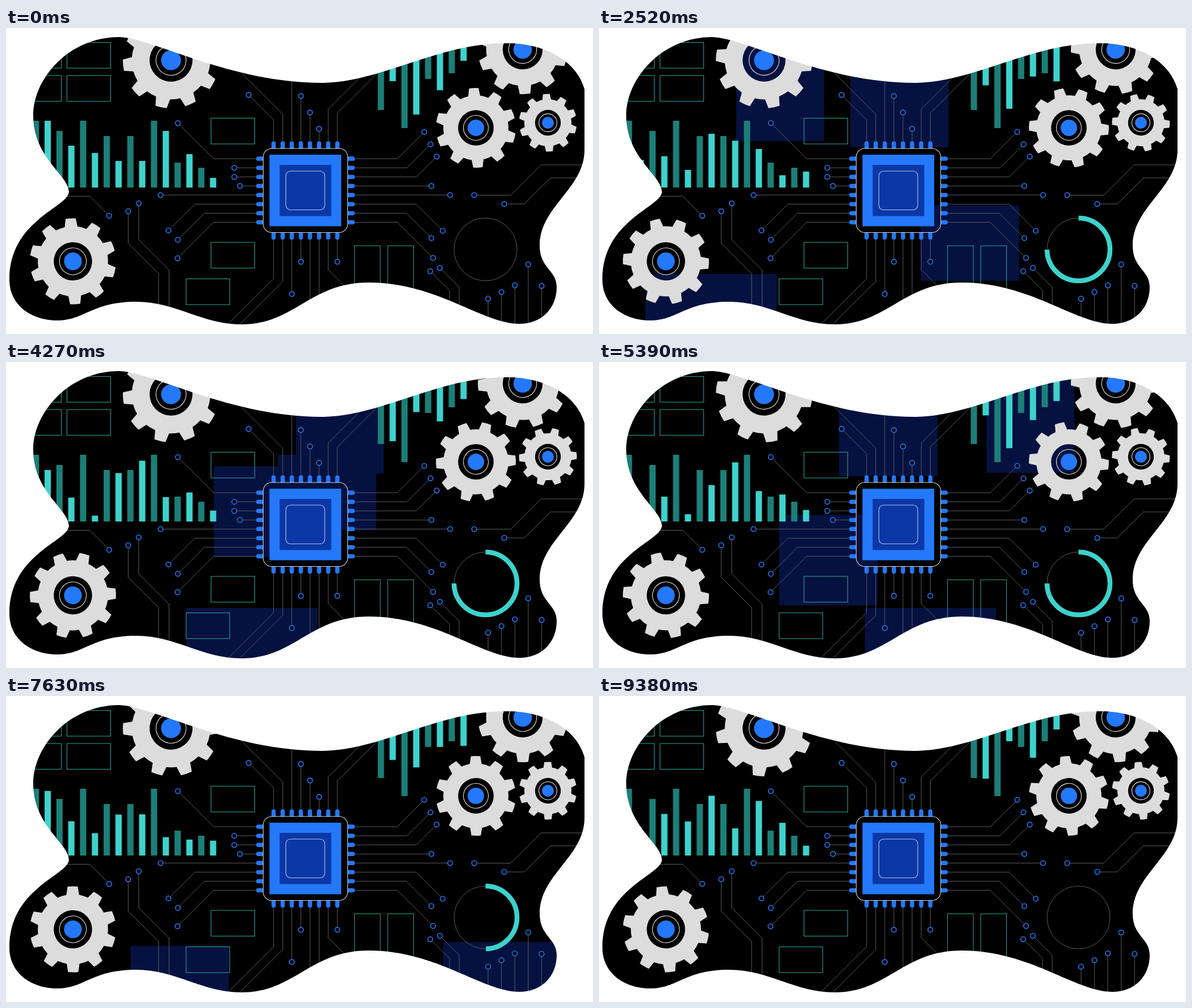
Animation, 1035 px wide and 541 px high, one loop 9.45 s. Source, as an HTML page with a canvas:

```html
<!DOCTYPE html>
<html lang="en">
<head>
<meta charset="utf-8">
<title>Circuit board</title>
<style>
html, body { margin: 0; width: 100%; height: 100%; overflow: hidden; background: #fff; }
canvas { display: block; }
</style>
</head>
<body>
<canvas id="stage" width="1035" height="541"></canvas>
<script>
const ctx = document.getElementById('stage').getContext('2d');
const LOOP = 9.45, STEP = 0.07, TAU = Math.PI * 2, RAD = TAU / 360;
const BLUE = '#2478fa', NAVY = '#051240', TEAL = '#3dd2cc', DEEP_TEAL = '#1b7f78',
  OUTLINE = '#2a9a93', WIRE = '#5c5c62', GEAR = '#dcdcdc';

// Everything outside the blob, painted last as a white mask
const mask = new Path2D(`M0 0H1035V541H0Z
  M200 16C110 16 48 90 48 155C48 230 111 260 111 290C108 318 6 340 6 445
  C6 490 45 517 90 517C140 517 150 484 230 484C300 484 345 524 415 524C510 524 535 450 640 450
  C760 450 840 523 905 523C945 523 971 495 971 458C971 428 941 425 941 385
  C941 315 1020 285 1020 215V108C1005 55 945 27 885 27C765 25 668 94 560 97C397 98 260 18 200 16Z`);

// Wires leaving the chip, clockwise from the top: straight run / 45° run, * for no ring
const chipWires = [
  '38/-44 48/-78* 115* 80 51 22 57/62* 50/76*',
  '75/-47.5 92/-41.5 108.5/-36 135 168 108/47 91/44 75/63',
  '39 53/-34* 116* 126* 39 96 74/80* 69/82*',
  '75/-63.5 91/-47 108/-46.5 168.5 28.5 38.5 38.5 75/63'
].map(side => side.split(' '));

// Wires away from the chip, starting at their ring
const looseWires = [
  '182,332 148,297.5 105,297.5', '215.5,324 215.5,380.5 269,434 269,492',
  '234,310 234,374.5 287.5,428 287.5,492', '825.5,295.5 890,295.5 943.5,242 1020,242',
  '878.5,311 914,311 960,265 1012,265', '748,430 782,463.5 782,490', '765,424 799,458 799,496',
  ...[478.5, 467, 455, 418, 456].map((y, i) => `${850 + 23.6 * i},${y} ${850 + 23.6 * i},525`)
].map(text => text.split(' ').map(p => p.split(',').map(Number)));

// Bars alternate: a still one (its end), then a moving one (from, to, cycles per loop)
const lowBars = [164, [164, 268, 2.5], 182, [208, 243, 1], 164, [221, 277, 1], 191, [235, 175, 1.5],
  191, [235, 168, 1], 164, [182, 262, 3], 238, [223, 263, 2], 247, [265, 253, 2]];
const highBars = [145, [94, 149, 3.5], 177, [153, 76, 3.5], 90, [110, 84, 2], 80, [58, 97, 2]];

const clamp = (v, lo, hi) => Math.min(hi, Math.max(lo, v));
const zigzag = u => 1 - Math.abs(1 - 2 * (u % 1));

function fillRect(color, x, y, w, h) {
  ctx.fillStyle = color;
  ctx.fillRect(x, y, w, h);
}

function stroke(color, width) {
  ctx.strokeStyle = color;
  ctx.lineWidth = width;
  ctx.stroke();
}

function circle(x, y, r) {
  ctx.beginPath();
  ctx.arc(x, y, r, 0, TAU);
}

function roundBox(x, y, w, h, r) {
  ctx.beginPath();
  ctx.roundRect(x, y, w, h, r);
}

function drawWire(points, ringed = true) {
  ctx.beginPath();
  points.forEach(p => ctx.lineTo(...p));
  stroke(WIRE, 1);
  if (!ringed) return;
  circle(...points[0], 4.3);
  ctx.fillStyle = '#000';
  ctx.fill();
  stroke('#226ce0', 1.8);
}

function drawShades(t) {
  fillRect(NAVY, -257.6 + 134.8 * t, 435, 231, 120);
  fillRect(NAVY, -145.4 + 153.7 * t, -20, 155, 223.5 - 1.4 * t);
  fillRect(NAVY, 693.7 - 50.2 * t, 528.7 - 85.4 * t, 173.5, 133.5);
  fillRect(NAVY, 553 - 43.7 * t, -142 + 76.5 * t, 173.5, 160);
}

function drawPanels() {
  const long = 77, short = 45.5;
  ctx.strokeStyle = OUTLINE;
  ctx.lineWidth = 1.1;
  for (const y of [25.5, 84])
    for (const x of [20.5, 107.5]) ctx.strokeRect(x, y, long, short);
  for (const [x, y] of [[361.5, 159.5], [361.5, 379], [317.5, 443.5]]) ctx.strokeRect(x, y, long, short);
  for (const x of [614.5, 673]) ctx.strokeRect(x, 385, short, long + 10);
}

function drawChip() {
  ctx.save();
  ctx.translate(528, 287.3);
  for (const side of chipWires) {
    side.forEach((route, i) => {
      const x = (i - 3.5) * 16.05, [run, slant = 0] = route.replace('*', '').split('/').map(Number);
      const turn = -87 - run;
      drawWire([[x + slant, turn - Math.abs(slant)], [x, turn], [x, -87]], !route.endsWith('*'));
      roundBox(x - 3.75, -87, 7.5, 13, [3.7, 3.7, 0, 0]);
      ctx.fillStyle = BLUE;
      ctx.fill();
    });
    ctx.rotate(TAU / 4);
  }
  ctx.restore();
  roundBox(453.5, 213, 149, 148.5, 15);
  stroke('#d4d4d4', 1.1);
  fillRect(BLUE, 464.5, 224, 126.5, 126.5);
  fillRect('#0b38a6', 482.5, 242, 91, 90.5);
  roundBox(493.5, 253, 68.5, 68.5, 8);
  stroke('#b4c3ea', 1.1);
}

function drawBars(bars, left, base, t) {
  bars.forEach((bar, i) => {
    const moving = i % 2, [from, to, cycles] = moving ? bar : [bar, bar, 0];
    const end = from + (to - from) * zigzag(cycles * t / LOOP);
    fillRect(moving ? TEAL : DEEP_TEAL, left + i * 20.83, base, 11, end - base);
  });
}

function drawDial(t) {
  circle(845.5, 391.5, 55.5);
  stroke(WIRE, 1);
  const sweep = 122 * clamp(Math.min(t - 0.31, 9.1 - t), 0, 270 / 122);
  if (!sweep) return;
  ctx.beginPath();
  ctx.arc(845.5, 391.5, 55.5, -TAU / 4, (sweep - 90) * RAD);
  stroke(TEAL, 8.5);
}

function drawGear(x, y, r, angle) {
  ctx.save();
  ctx.translate(x, y);
  ctx.rotate((angle - 90) * RAD);
  ctx.beginPath();
  for (let a = 0; a < 360; a += 36) {
    ctx.arc(0, 0, r, (a - 6.8) * RAD, (a + 6.8) * RAD);
    ctx.arc(0, 0, r * 0.815, (a + 10.5) * RAD, (a + 25.5) * RAD);
  }
  ctx.closePath();
  ctx.moveTo(r * 0.445, 0);
  ctx.arc(0, 0, r * 0.445, 0, TAU);
  ctx.fillStyle = GEAR;
  ctx.fill('evenodd');
  circle(0, 0, r * 0.312);
  stroke('#e6e6e6', 1.1);
  circle(0, 0, r * 0.206);
  ctx.fillStyle = BLUE;
  ctx.fill();
  ctx.restore();
}

function drawGears(t) {
  const turn = 360 * t / LOOP;
  drawGear(291, 57, 85, 2 * turn + 12);
  for (const [x, y, r] of [[118, 412.5, 76], [911, 38, 79], [828.5, 176.5, 70.5], [955.5, 167.5, 51]])
    drawGear(x, y, r, turn - 3);
}

function draw(t) {
  fillRect('#000', 0, 0, 1035, 541);
  drawShades(t);
  drawPanels();
  looseWires.forEach(points => drawWire(points));
  drawBars(lowBars, 47.2, 282, t);
  drawBars(highBars, 655.5, 0, t);
  drawDial(t);
  drawChip();
  drawGears(t);
  ctx.fillStyle = '#fff';
  ctx.fill(mask, 'evenodd');
}

function tick() {
  const t = performance.now() / 1000 % LOOP;
  draw(Math.floor(t / STEP) * STEP);
  requestAnimationFrame(tick);
}
tick();
</script>
</body>
</html>
```
